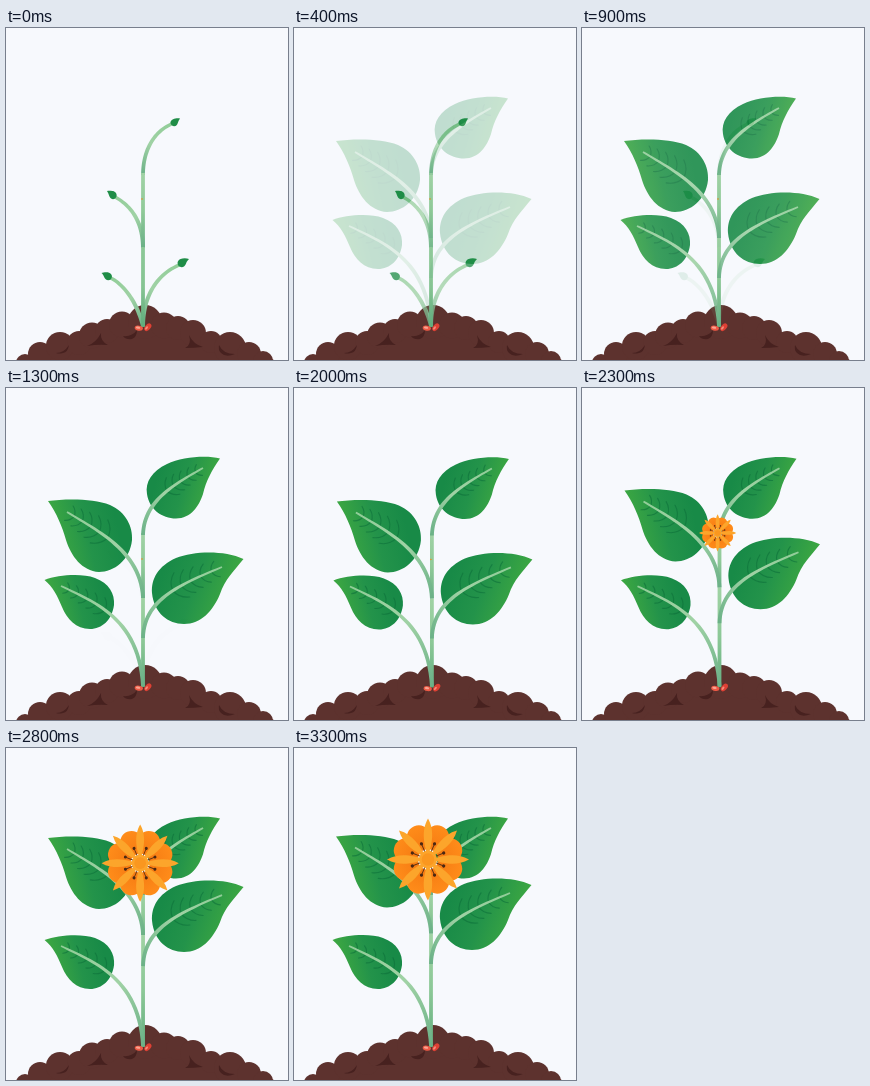
Animation, 282 px wide and 332 px high, one loop 4000 ms. Source, as an HTML page with a canvas:

```html
<!DOCTYPE html>
<html lang="en">
<head>
<meta charset="utf-8">
<title>Growing plant</title>
<style>
  html, body { margin: 0; width: 100%; height: 100%; overflow: hidden; background: #f7f9fd; }
  canvas { position: absolute; left: 0; top: 0; width: 282px; height: 332px; }
</style>
</head>
<body>
<canvas id="sprout"></canvas>
<canvas id="plant"></canvas>
<script>
const W = 282, H = 332, LOOP = 4000, STEP = 100;
const dpr = window.devicePixelRatio || 1;
const LIGHT = '#a0d2a5', DARK = '#6bb187';

// Leaves: outline, tip, vein (tip to stem), gradient line, bud tip and scale, final rise
const leaves = [
  { shape: 'M214 70.500C200 67 176 69 161 76C146 83 139 94 141 106C143 121 156 130.500 170 130.500C185 130.500 193 118 197 106C200 93 206 82 214 70.500Z',
    tip: [214, 70.5], vein: [197, 80, 165, 98, 138, 114, 137, 147], grad: [150, 92, 204, 108],
    bud: [174, 90.5, .13], rise: 0, rib: 14 },
  { shape: 'M42 113C58 111 87 110 104 117C120 124 127 139 126 152C124 172 108 184 93 184C76 183 65 168 60 152C56 138 51 126 42 113Z',
    tip: [42, 113], vein: [61, 124, 90, 142, 135, 163, 137, 210], grad: [112, 140, 52, 154],
    bud: [101, 163, .115], rise: 24.5, rib: 19 },
  { shape: 'M38.500 192C52 187 75 185 89 190C103 195 109 206 108 217C106 232 96 241 84 241C70 241 61 231 56 219C51 207 47 199 38.500 192Z',
    tip: [38.5, 192], vein: [55, 198, 88, 214, 133, 230, 137, 298], grad: [98, 206, 48, 218],
    bud: [95.5, 245, .15], rise: 0, rib: 13 },
  { shape: 'M237.500 171C218 162 188 163 170 170C152 178 145 191 146 205C148 225 162 236 178 236C195 236 207 223 214 206C219 191 228 183 237.500 171Z',
    tip: [237.5, 171], vein: [216, 179, 170, 198, 138, 213, 137, 250], grad: [156, 186, 222, 210],
    bud: [183, 231, .125], rise: 34, rib: 19 }
];
leaves.forEach(l => l.path = new Path2D(l.shape));

// Mound bumps: x, top, radius
const bumps = [[19, 326, 9], [34, 314, 12], [54, 304, 14], [73, 303, 12], [86, 294.5, 13],
  [101, 291, 12], [116, 283.5, 13], [139, 277, 17], [158, 284.5, 13], [172, 288, 12],
  [187, 292, 13], [205, 303, 11], [224, 304, 16], [243, 314, 12], [257, 323, 10]];
const clods = new Path2D('M50 325Q58 325 63 317Q62 324 57 325Q53 326 50 325Z' +
  'M81 318Q90 315 95 305Q94 313 102 317Q92 316 81 318Z' +
  'M117 308Q126 309 131 302Q131 309 126 311Q120 312 117 308Z' +
  'M183 307Q187 316 197 319Q188 320 179 320Q186 317 183 307Z' +
  'M213 317Q217 326 229 326Q220 330 215 325Q212 322 213 317Z');

function context(id) {
  const c = document.getElementById(id);
  c.width = W * dpr;
  c.height = H * dpr;
  const g = c.getContext('2d');
  g.scale(dpr, dpr);
  return g;
}

const lerp = (a, b, p) => a + (b - a) * p;
const ease = x => 1 - Math.pow(1 - Math.min(1, Math.max(0, x)), 3.2);

function ramp(g, line, stops) {
  const r = g.createLinearGradient(...line);
  stops.forEach((c, i) => r.addColorStop(i / (stops.length - 1), c));
  return r;
}

function ellipse(g, x, y, rx, ry, turn, fill) {
  g.fillStyle = fill;
  g.beginPath();
  g.ellipse(x, y, rx, ry, turn, 0, 7);
  g.fill();
}

// Point and unit normal on a cubic curve
function along(c, t) {
  const u = 1 - t;
  const at = i => u * u * u * c[i] + 3 * u * u * t * c[i + 2] + 3 * u * t * t * c[i + 4] + t * t * t * c[i + 6];
  const slope = i => u * u * (c[i + 2] - c[i]) + 2 * u * t * (c[i + 4] - c[i + 2]) + t * t * (c[i + 6] - c[i + 4]);
  const dx = slope(0), dy = slope(1), d = Math.hypot(dx, dy) || 1;
  return { x: at(0), y: at(1), nx: -dy / d, ny: dx / d };
}

function branch(g, curve, w0, w1) {
  const n = 28, right = [], left = [];
  for (let i = 0; i <= n; i++) {
    const p = along(curve, i / n), w = lerp(w0, w1, Math.min(1, i / n * 1.6)) / 2;
    right.push([p.x + p.nx * w, p.y + p.ny * w]);
    left.unshift([p.x - p.nx * w, p.y - p.ny * w]);
  }
  g.fillStyle = ramp(g, [curve[0], curve[1], curve[6], curve[7]], ['#91cd98', LIGHT, DARK]);
  g.beginPath();
  right.concat(left).forEach(p => g.lineTo(...p));
  g.fill();
}

function stalk(g, top, bottom, stops) {
  g.fillStyle = ramp(g, [0, top, 0, bottom], stops);
  g.fillRect(135.1, top, 3.8, bottom - top);
}

function soil(g) {
  g.fillStyle = '#f7f9fd';
  g.fillRect(0, 0, W, H);
  g.fillStyle = '#5d322e';
  g.beginPath();
  g.moveTo(10, H);
  bumps.forEach(([x, y, r]) => g.lineTo(x, y + r * .4));
  g.lineTo(268, H);
  g.fill();
  bumps.forEach(([x, y, r]) => ellipse(g, x, y + r, r, r, 0, '#5d322e'));
  g.fillStyle = '#47211f';
  g.fill(clods);
}

function seed(g) {
  ellipse(g, 132.8, 300.2, 4.2, 2.5, .15, '#ee5a46');
  ellipse(g, 141.8, 299.2, 4.4, 2.7, -.85, '#de4034');
  ellipse(g, 132, 299.6, 2.2, 1.1, .15, '#f9a592');
  ellipse(g, 140.5, 300, 1.9, 1, -.85, '#f58b78');
}

function leaf(g, l) {
  g.fillStyle = ramp(g, l.grad, ['#188a47', '#23934a', '#3ba642']);
  g.fill(l.path);
  g.strokeStyle = 'rgba(14,112,58,.6)';
  g.lineWidth = 1.1;
  g.lineCap = 'round';
  for (let i = 0; i < 5; i++) {
    const p = along(l.vein, .08 + i * .085), len = l.rib * (.55 + .1 * i);
    for (const side of [-1, 1]) {
      const ox = p.nx * side, oy = p.ny * side, fx = -p.ny, fy = p.nx;
      g.beginPath();
      g.moveTo(p.x, p.y);
      g.quadraticCurveTo(p.x + ox * len * .55 + fx * len * .1, p.y + oy * len * .55 + fy * len * .1,
        p.x + ox * len * .8 + fx * len * .6, p.y + oy * len * .8 + fy * len * .6);
      g.stroke();
    }
  }
}

function flower(g, x, y, size) {
  g.save();
  g.translate(x, y);
  g.scale(size, size);
  const around = (offset, draw) => {
    for (let i = 0; i < 8; i++) {
      g.save();
      g.rotate((i + offset) * Math.PI / 4);
      draw();
      g.restore();
    }
  };
  const lobe = g.createRadialGradient(0, 0, 8, 0, 0, 37);
  lobe.addColorStop(0, '#f57a12');
  lobe.addColorStop(1, '#ff8d1a');
  around(.5, () => ellipse(g, 0, -23, 12.5, 13, 0, lobe));
  around(0, () => {
    g.fillStyle = '#fca52b';
    g.beginPath();
    g.moveTo(-1.5, -7);
    g.bezierCurveTo(-3, -14, -7.5, -28, 0, -41);
    g.bezierCurveTo(7.5, -28, 3, -14, 1.5, -7);
    g.fill();
  });
  around(.5, () => {
    g.fillStyle = '#5a3013';
    g.fillRect(-.45, -17, .9, 9);
    ellipse(g, 0, -17, 1.6, 1.6, 0, '#4a2814');
  });
  ellipse(g, 0, 0, 9, 9, 0, '#fca52b');
  ellipse(g, 0, 0, 6.2, 6.2, 0, '#fa971f');
  g.restore();
}

function drawSprout(g) {
  soil(g);
  branch(g, [103, 249, 120, 257, 132, 278, 137, 298], 3.4, 4);
  branch(g, [176, 236, 150, 245, 137, 270, 137, 298], 3.4, 4);
  branch(g, [105, 167, 125, 176, 137, 194, 137, 220], 3.2, 4);
  branch(g, [168, 95, 149, 102, 137, 121, 137, 147], 3.4, 3.8);
  stalk(g, 145, 219, [LIGHT, '#90ca99', DARK]);
  stalk(g, 219, 299, ['#8cc897', '#86c493', '#5eab7b']);
  for (const l of leaves) {
    const [x, y, s] = l.bud;
    g.save();
    g.translate(x, y);
    g.scale(s, s);
    g.translate(-l.tip[0], -l.tip[1]);
    g.fillStyle = '#1f8d47';
    g.fill(l.path);
    g.restore();
  }
  seed(g);
  flower(g, 136, 171, .02);
}

function drawPlant(g, bloom, shift) {
  soil(g);
  g.save();
  g.translate(shift, shift * .5);
  const join = 210 - leaves[1].rise * bloom;
  const each = draw => leaves.forEach(l => {
    g.save();
    g.translate(0, -l.rise * bloom);
    draw(l);
    g.restore();
  });
  each(l => leaf(g, l));
  stalk(g, 145, join, [LIGHT, '#90ca99', DARK]);
  stalk(g, join, 299, ['#a0d3a4', '#8cc897', '#63ae7f']);
  each(l => branch(g, l.vein, 1.8, 3.8));
  seed(g);
  flower(g, lerp(136, 134, bloom), lerp(171, 111.5, bloom), lerp(.02, 1, bloom));
  g.restore();
}

const low = context('sprout'), high = context('plant');
drawSprout(low);
let last = -1;
const start = performance.now();

function tick() {
  const t = Math.floor((performance.now() - start) % LOOP / STEP) * STEP;
  if (t !== last) {
    last = t;
    const grow = ease((t - 300) / 1200), bloom = ease((t - 2100) / 1200);
    drawPlant(high, bloom, t < 2000 ? 0 : .9 * (1 - bloom));
    high.canvas.style.opacity = grow;
  }
  requestAnimationFrame(tick);
}
tick();
</script>
</body>
</html>
```
